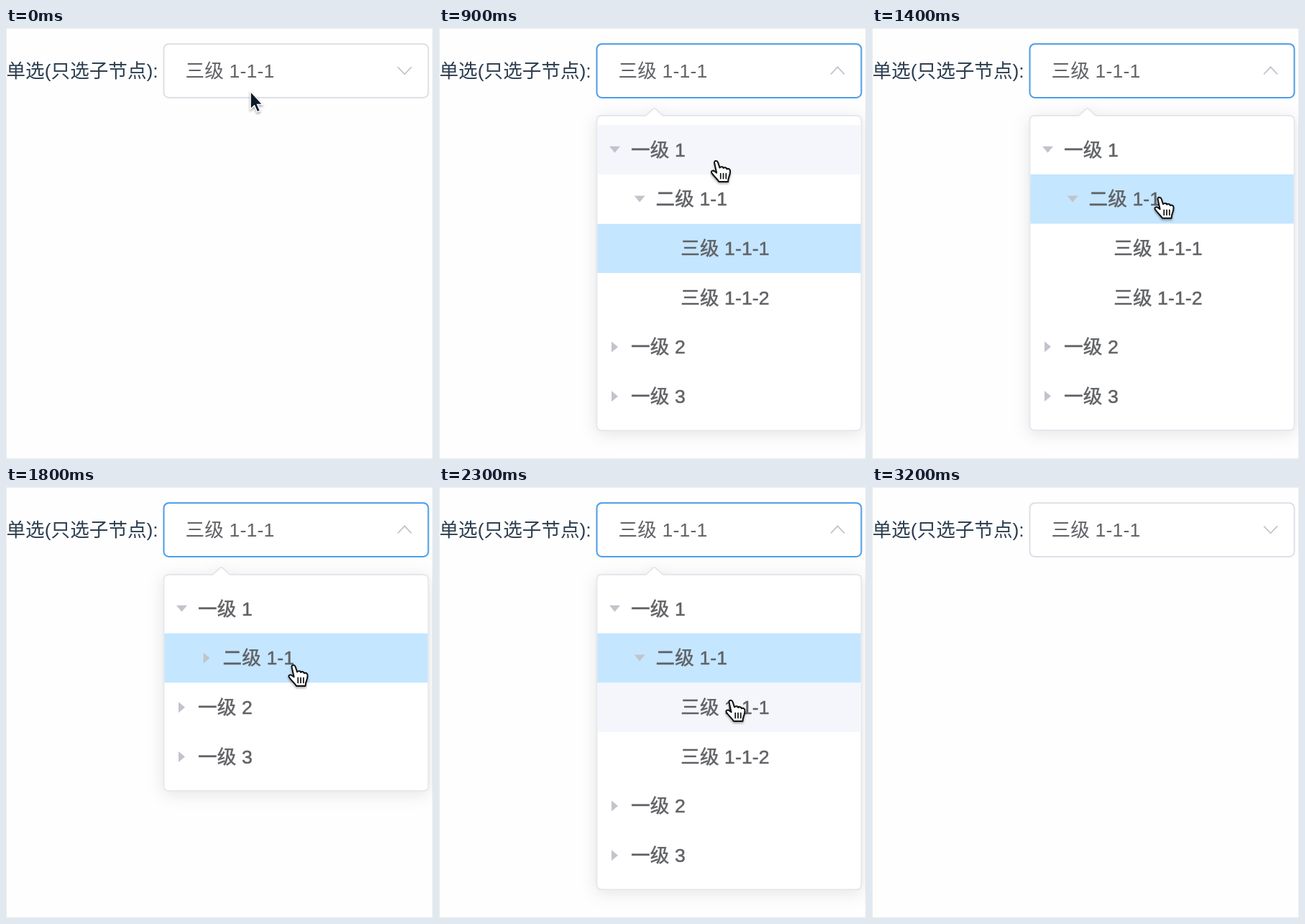
Write an HTML page that moves like this. It is 594 by 600 pixels and loops after 3.3 s.

```html
<!DOCTYPE html>
<html lang="zh-CN">
<head>
<meta charset="utf-8">
<title>单选</title>
<style>
  html, body { margin: 0; width: 100%; height: 100%; overflow: hidden; background: #fefefe; }
  svg { display: block; width: 594px; height: 600px; }
  text { font: 26.6px "Liberation Sans", "Noto Sans CJK SC", "Noto Sans CJK", sans-serif; fill: #606266; }
  .label { fill: #2c3e50; }
  .row text { font-weight: 500; stroke: #606266; stroke-width: .5px; }
  .tri { fill: #c0c4cc; }
  .line { fill: none; stroke: #c0c4cc; stroke-width: 1.7px; }
  .panel { fill: #fff; stroke: #e4e7ed; stroke-width: 1.8px; filter: drop-shadow(0 4px 11px rgba(0, 0, 0, .1)); }
  #cursor { filter: drop-shadow(0 2px 1.5px rgba(0, 0, 0, .35)); }
</style>
</head>
<body>
<svg viewBox="0 0 594 600">
  <defs><clipPath id="clip"><rect id="clipBox" x="219" y="272.4" width="370"/></clipPath></defs>
  <rect x=".5" y=".5" width="593" height="599" fill="#fefefe" stroke="#ebebeb"/>
  <text class="label" x=".5" y="69">单选(只选子节点):</text>

  <rect x="219.5" y="22.2" width="368" height="74.8" rx="7" fill="#fff" stroke="#dcdfe6" stroke-width="1.9"/>
  <rect id="focus" x="219.5" y="22.2" width="368" height="74.8" rx="7" fill="none" stroke="#4c9eea" stroke-width="1.9"/>
  <text x="249.5" y="69" letter-spacing=".15">三级 1-1-1</text>
  <path id="caret" class="line" d="M-9.5 5L0-5L9.5 5"/>
  <g id="clear" class="line" transform="translate(554.5 60)">
    <circle r="11"/><path d="M-4-4L4 4M4-4L-4 4"/>
  </g>

  <g id="menu">
    <path id="panel" class="panel"/>
    <g id="top"></g>
    <g id="kids" clip-path="url(#clip)"></g>
    <g id="rest"></g>
  </g>

  <circle id="ring" r="58.5" fill="none" stroke="#111" stroke-width="2.6"/>
  <g id="cursor">
    <path id="arrow" d="M0 0V25L5.5 20L9.5 29L13.5 27.3L9.7 18.5H17Z" fill="#0b1a28" stroke="#fff" stroke-width="1.6"/>
    <g id="hand" transform="translate(-8 -1)" stroke-linejoin="round" stroke-linecap="round">
      <path d="M5.5 3.5C5 .5 9.5 0 10.5 3L13 10.5C14 8.5 18 8.8 18 11C19.5 9.5 22.5 10 22.8 12.3C25 11 28 12.5 27.5 16C27.3 21 25.5 23 25 26L24.5 30H12C9.5 26 5 22.5 2 18C0 15 3.5 13.5 6 15.5L8.6 17.5Z" fill="#fff" stroke="#111" stroke-width="2"/>
      <path d="M14.2 18.5V25.5M18 18.5V25.5M21.8 18.5V25.5" stroke="#111" stroke-width="1.7"/>
    </g>
  </g>
</svg>
<script>
const LOOP = 3300, STEP = 100;
const TOP = 135, ROW = 68.7;
const $ = id => document.getElementById(id);
const set = (el, name, value) => el.setAttribute(name, value);
const show = (el, on) => { el.style.display = on ? '' : 'none'; };

// label, indent level, parent group, has triangle
const rows = [
  ['一级 1', 0, 'top', true],
  ['二级 1-1', 1, 'top', true],
  ['三级 1-1-1', 2, 'kids', false],
  ['三级 1-1-2', 2, 'kids', false],
  ['一级 2', 0, 'rest', true],
  ['一级 3', 0, 'rest', true]
].map(([label, level, group, branch], i) => {
  const y = TOP + ROW * i, x = 244.5 + 34.6 * level;
  $(group).insertAdjacentHTML('beforeend', `<g class="row">
    <rect x="220.4" y="${y}" width="366.2" height="${ROW}"/>
    ${branch ? '<path class="tri" d="M-4.5-7.5L4.5 0L-4.5 7.5Z"/>' : ''}
    <text x="${x + 22.5}" y="${y + 43.6}" letter-spacing=".1">${label}</text></g>`);
  const g = $(group).lastElementChild;
  const tri = g.querySelector('.tri');
  const turn = a => set(tri, 'transform', `translate(${x} ${y + 34.3}) rotate(${a})`);
  if (tri) turn(i ? 0 : 90);
  return { bar: g.querySelector('rect'), turn };
});

// cursor path: time, x, y of the tip
const path = [
  [0, 340, 88], [200, 353, 75], [500, 353, 75], [1150, 400, 234], [1300, 400, 234],
  [1700, 400, 248], [1900, 400, 248], [2300, 406, 297], [2500, 406, 300],
  [2600, 407, 308], [3000, 465, 552]
];
const clicks = [[100, 200], [1200, 1400], [1900, 2000], [2400, 2500]];

const clamp = v => Math.min(1, Math.max(0, v));
const bezier = (x1, y1, x2, y2) => x => {
  const at = (s, a, b) => 3 * (1 - s) ** 2 * s * a + 3 * (1 - s) * s * s * b + s ** 3;
  let lo = 0, hi = 1;
  for (let i = 0; i < 24; i++) {
    const mid = (lo + hi) / 2;
    if (at(mid, x1, x2) < x) lo = mid; else hi = mid;
  }
  return at(lo, y1, y2);
};
const ease = bezier(.25, .1, .25, 1);
const easeInOut = bezier(.42, 0, .58, 1);
const zoom = bezier(.23, 1, .32, 1);
const phase = (t, start, length, curve) => curve(clamp((t - start) / length));
// rises at the first time and falls back at the second
const pulse = (t, on, off, length, curve) => phase(t, on, length, curve) - phase(t, off, length, curve);

function tipAt(t) {
  const i = path.findIndex(p => p[0] > t);
  if (i < 0) return path[path.length - 1].slice(1);
  const [t0, x0, y0] = path[i - 1], [t1, x1, y1] = path[i];
  const k = easeInOut((t - t0) / (t1 - t0));
  return [x0 + (x1 - x0) * k, y0 + (y1 - y0) * k];
}

function panelPath(bottom) {
  return `M226.5 122H287.5L298 112.5Q299.5 111 301 112.5L311.5 122H580.5Q587.5 122 587.5 129
    V${bottom - 7}Q587.5 ${bottom} 580.5 ${bottom}H226.5Q219.5 ${bottom} 219.5 ${bottom - 7}V129Q219.5 122 226.5 122Z`;
}

function draw(t) {
  const [x, y] = tipAt(t);
  const hand = t >= 100 && t < 2700;
  set($('cursor'), 'transform', `translate(${x} ${y})`);
  show($('cursor'), t < 3100);
  show($('hand'), hand);
  show($('arrow'), !hand);
  set($('ring'), 'cx', x + 2);
  set($('ring'), 'cy', y);
  show($('ring'), clicks.some(([a, b]) => t >= a && t < b));

  const overInput = hand && y < 97;
  show($('clear'), overInput);
  show($('caret'), !overInput);
  const up = pulse(t, 190, 2517, 300, ease);
  set($('caret'), 'transform', `translate(554.5 59.3) rotate(${180 * (1 - up)})`);
  $('focus').style.opacity = pulse(t, 90, 2530, 270, ease);

  const open = pulse(t, 190, 2517, 300, zoom);
  show($('menu'), open > .001);
  set($('menu'), 'transform', `translate(0 ${122 * (1 - open)}) scale(1 ${open})`);
  $('menu').style.opacity = open;

  const folded = pulse(t, 1390, 1950, 300, easeInOut);
  const lift = 2 * ROW * folded;
  set($('panel'), 'd', panelPath(560.3 - lift));
  set($('clipBox'), 'height', 2 * ROW - lift);
  set($('rest'), 'transform', `translate(0 ${-lift})`);
  rows[1].turn(90 * (1 - folded));

  const selected = t >= 1400 && t < 2500 ? 1 : 2;
  const hovered = t < 2600 ? Math.floor((y - TOP) / ROW) : -1;
  rows.forEach(({ bar }, i) =>
    set(bar, 'fill', i === selected ? '#c4e6ff' : i === hovered ? '#f5f6fb' : 'none'));
}

const begin = performance.now();
function tick() {
  const t = (performance.now() - begin) % LOOP;
  draw(Math.floor(t / STEP) * STEP);
  requestAnimationFrame(tick);
}
tick();
</script>
</body>
</html>
```
